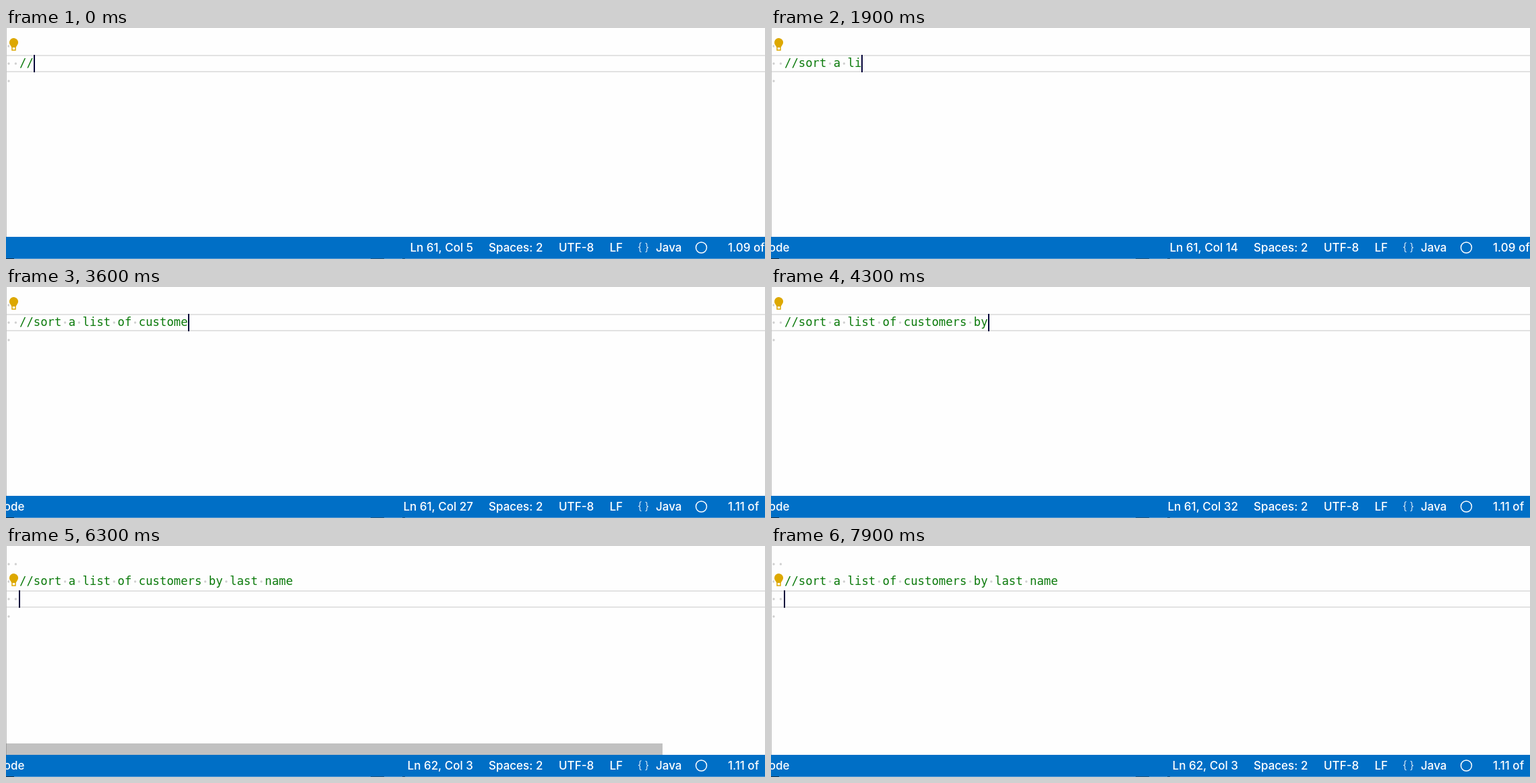
These frames come from a looping animation (1126 by 344 pixels, 8000 ms). An HTML page with a canvas:

```html
<!DOCTYPE html>
<html lang="en">
<head>
<meta charset="utf-8">
<title>Editor typing</title>
<style>
html, body { margin: 0; width: 100%; height: 100%; overflow: hidden; background: #fefefe; }
canvas { display: block; }
</style>
</head>
<body>
<canvas id="stage" width="1126" height="344"></canvas>
<script>
const ctx = document.getElementById('stage').getContext('2d');
const W = 1126, H = 344, LOOP = 8000;
const CHAR = 10.4, LINE = 26, INDENT = 20;
const COMMENT = '//sort a list of customers by last name';
const NEWLINE = 6300;
const CODE_FONT = '17.28px "DejaVu Sans Mono", monospace';
const BAR_FONT = '500 17px Inter, sans-serif';

// [time, characters typed]
const KEYS = [[0, 2], [700, 2], [1880, 11], [2880, 19.2], [4280, 29.2], [5720, 39], [LOOP, 39]];

function typedCount(t) {
  const i = KEYS.findIndex(k => k[0] > t);
  const [t0, n0] = KEYS[i - 1], [t1, n1] = KEYS[i];
  return Math.floor(n0 + (n1 - n0) * (t - t0) / (t1 - t0));
}

function rect(color, x, y, w, h) {
  ctx.fillStyle = color;
  ctx.fillRect(x, y, w, h);
}

function text(str, x, y, align = 'left') {
  ctx.textAlign = align;
  ctx.fillText(str, x, y);
}

function dot(x, y) {
  ctx.fillStyle = '#d0d0d0';
  ctx.beginPath();
  ctx.arc(x, y, 1.7, 0, Math.PI * 2);
  ctx.fill();
}

function indentDots(row, count) {
  for (let i = 0; i < count; i++) dot(4 + i * CHAR, 27 + row * LINE);
}

function comment(count) {
  ctx.font = CODE_FONT;
  for (let i = 0; i < count; i++) {
    const x = INDENT + i * CHAR;
    if (COMMENT[i] === ' ') {
      dot(x + CHAR / 2, 53);
    } else {
      ctx.fillStyle = '#0b7a0b';
      text(COMMENT[i], x, 58);
    }
  }
}

function bulb(y) {
  rect('#fefefe', 5, y - 9, 13, 19);
  ctx.fillStyle = ctx.strokeStyle = '#dda800';
  ctx.beginPath();
  ctx.arc(11.5, y - 2.5, 6.5, Math.PI * 0.82, Math.PI * 0.18);
  ctx.lineTo(14.5, y + 5);
  ctx.lineTo(8.5, y + 5);
  ctx.fill();
  ctx.lineWidth = 1.5;
  ctx.strokeRect(9, y + 4, 5, 5);
}

function statusBar(t, line, col) {
  rect('#006fc6', 0, 311, W, 33);
  rect('#4f98d3', 0, 343, W, 1);
  rect('#17324a', 0, 343, 12, 1);
  rect('#245a86', 541, 343, 20, 1);
  rect('#245a86', 588, 343, 4, 1);
  ctx.font = BAR_FONT;
  ctx.fillStyle = '#fff';
  if (t >= 700) text('Code', 27.5, 333, 'right');
  text(`Ln ${line}, Col ${col}`, 693, 333, 'right');
  text('Spaces: 2', 716, 333);
  text('UTF-8', 820, 333);
  text('LF', 895.5, 333);
  text('Java', 964, 333);
  text(t < 2400 ? '1.09 of' : '1.11 of', 1071, 333);
  ctx.font = '300 16px Inter, sans-serif';
  text('{', 937, 332);
  text('}', 947.5, 332);
  ctx.strokeStyle = '#fff';
  ctx.lineWidth = 1.5;
  ctx.beginPath();
  ctx.arc(1031.5, 327, 8, 0, Math.PI * 2);
  ctx.stroke();
}

function scrollbar(t) {
  const age = t - NEWLINE;
  if (age < 0) return;
  const alpha = 0.4 * Math.max(0, Math.min(1, (1300 - age) / 800));
  rect(`rgba(100, 100, 100, ${alpha})`, 0, 294, 974, 17);
}

function draw(t) {
  const entered = t >= NEWLINE;
  const row = entered ? 1 : 0;
  const count = typedCount(t);
  const top = 40 + row * LINE;

  rect('#fefefe', 0, 0, W, H);
  rect('#e2e2e2', 0, top, W, 2);
  rect('#e2e2e2', 0, top + 24, W, 2);
  rect('#c6c6c6', 0, 0, 1, 311);

  indentDots(0, 2);
  indentDots(1, 2);
  if (entered) indentDots(2, 2);
  indentDots(2 + row, 1);
  comment(count);
  bulb(24 + row * LINE);

  const blinkOff = t >= NEWLINE + 500 && t < NEWLINE + 1000;
  const cursorX = entered ? 19 : Math.round(INDENT + count * CHAR);
  if (!blinkOff) rect('#05053a', cursorX, top, 2, 26);

  scrollbar(t);
  statusBar(t, 61 + row, entered ? 3 : count + 3);
}

const start = performance.now();
function tick() {
  draw((performance.now() - start) % LOOP);
  requestAnimationFrame(tick);
}
tick();
</script>
</body>
</html>
```
